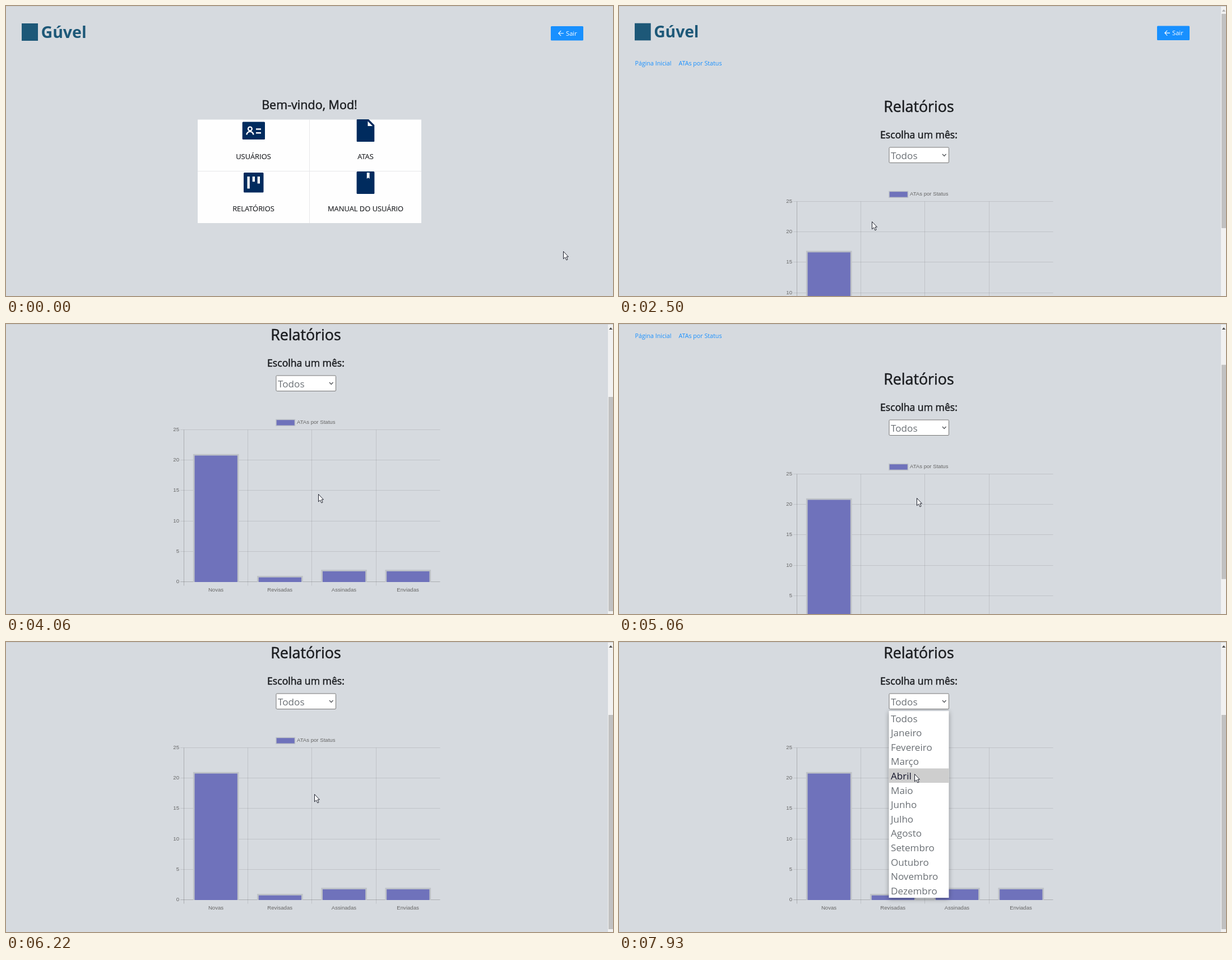
An HTML page for the animation above (8 s loop, 1083x517 px).

```html
<!DOCTYPE html>
<html lang="pt-BR">
<head>
<meta charset="utf-8">
<title>Relatórios</title>
<style>
@property --scroll { syntax: '<number>'; inherits: true; initial-value: 0; }
@property --row { syntax: '<integer>'; inherits: true; initial-value: 0; }

html, body { margin: 0; width: 100%; height: 100%; overflow: hidden; background: #d6dadf; }
svg {
  display: block; width: 1083px; height: 517px;
  font-family: 'Open Sans', 'Noto Sans', sans-serif;
  animation: scroll 8s infinite ease-out, row 8s infinite step-end;
}
text { white-space: pre; }
.mid { text-anchor: middle; }
.end { text-anchor: end; }
.head { fill: #1b1d20; stroke: #1b1d20; stroke-width: .5; }
.card { font-size: 12.9px; fill: #1b1d20; stroke: #1b1d20; stroke-width: .15; }
.link { font-size: 10.7px; fill: #1890ff; }
.opt { font-size: 17.1px; fill: #6b7075; }
.tick { font: 9.6px 'Liberation Sans', Arial, sans-serif; fill: #666; }
.logo { font-size: 28.5px; font-weight: 700; fill: #1d5878; }
.icon { fill: #002b5e; }
.hole { fill: #fff; }
.bar { fill: #6f72bb; stroke: #bec2c7; stroke-width: 5.4; paint-order: stroke; }
.grid { stroke: rgba(0, 0, 0, .1); }
.axis { stroke: rgba(0, 0, 0, .2); }

.home { animation: leave 8s infinite step-end; }
.report { visibility: hidden; animation: enter 8s infinite step-end; }
.page { transform: translateY(calc(var(--scroll) * -1px)); }
.thumb { transform: translateY(calc(var(--scroll) * .725px)); }
.up { opacity: calc(.4 + var(--scroll)); }
.chart { opacity: 0; animation: chart 8s infinite step-end; }
.grow { animation: grow 8s infinite linear; }
.lift {
  opacity: 0; fill: #fefefe;
  filter: drop-shadow(0 1px 1px rgba(0, 0, 0, .16)) drop-shadow(0 3px 4px rgba(0, 0, 0, .28));
  animation: lift 8s infinite linear;
}
.list { visibility: hidden; animation: open 8s infinite step-end; }
.sheet { filter: drop-shadow(0 2px 4px rgba(0, 0, 0, .35)); }
.chosen { opacity: calc(1 - max(var(--row) - var(--i), var(--i) - var(--row))); }
.chosen .opt { fill: #14152b; }
.cursor { animation: move 8s infinite linear; fill: #fff; stroke: #1c1f2b; stroke-width: 1; stroke-linejoin: round; }
.arrow { animation: arrow 8s infinite step-end; }
.hand { opacity: 0; animation: hand 8s infinite step-end; }

@keyframes leave { 24.5% { visibility: hidden; } }
@keyframes enter { 24.5% { visibility: visible; } }
@keyframes chart { 26.3% { opacity: 1; } }
@keyframes open { 88.4% { visibility: visible; } }
@keyframes arrow { 8.6%, 20% { opacity: 0; } 22.6% { opacity: 1; } }
@keyframes hand { 8.6%, 20% { opacity: 1; } 22.6% { opacity: 0; } }
@keyframes lift { 0%, 8.6% { opacity: 0; } 11.5%, 24.5% { opacity: 1; } 24.6%, 100% { opacity: 0; } }
@keyframes grow {
  0%, 27% { transform: translateY(var(--rise)); animation-timing-function: cubic-bezier(.165, .84, .44, 1); }
  39.5%, 100% { transform: none; }
}
@keyframes scroll {
  0%, 39.8% { --scroll: 0; }
  46.75%, 51.2% { --scroll: 160; }
  57%, 63.5% { --scroll: 81; }
  67.5%, 70.8% { --scroll: 0; }
  74.75%, 100% { --scroll: 160; }
}
@keyframes row {
  0% { --row: 0; }
  89.9% { --row: 1; }
  90.8% { --row: 2; }
  91.8% { --row: 3; }
  92.7% { --row: 4; }
  93.6% { --row: 5; }
  99.1%, 100% { --row: 4; }
}
@keyframes move {
  0%, .8% { transform: translate(994px, 437px); }
  3.5% { transform: translate(850px, 434px); }
  7% { transform: translate(590px, 404px); }
  10.5% { transform: translate(439px, 345px); }
  12.5%, 24.5% { transform: translate(447px, 343px); }
  27.4%, 31.3% { transform: translate(451px, 384px); }
  39% { transform: translate(535px, 282px); }
  46.75%, 50.8% { transform: translate(557px, 303px); }
  59%, 63.5% { transform: translate(531px, 310px); }
  72%, 77.8% { transform: translate(550px, 271px); }
  87%, 88.4% { transform: translate(545px, 107px); }
  95%, 98.2% { transform: translate(532px, 286px); }
  99.1%, 100% { transform: translate(527px, 235px); }
}
</style>
</head>
<body>
<svg viewBox="0 0 1083 517">
  <defs>
    <g id="brand">
      <rect x="28" y="31" width="29" height="31" fill="#1d5878"/>
      <text class="logo" x="62.5" y="57">Gúvel</text>
    </g>
    <g id="exit">
      <rect width="58" height="25.5" rx="1.5" fill="#1890ff"/>
      <path d="M23 12.7H14M18.2 8.2 13.8 12.7l4.4 4.5" fill="none" stroke="#fff" stroke-width="1.1"/>
      <text x="27" y="16.8" font-size="11.2" fill="#fff">Sair</text>
    </g>
    <clipPath id="plot"><rect x="310" y="340" width="470" height="279.6"/></clipPath>
  </defs>

  <g class="home">
    <use href="#brand"/>
    <use href="#exit" x="972" y="36"/>
    <text class="head mid" x="541.5" y="184" font-size="21.5">Bem-vindo, Mod!</text>
    <rect x="342" y="202.5" width="399" height="184.5" fill="#fefefe"/>
    <rect class="lift" x="342" y="295" width="199.5" height="92.3"/>
    <rect x="541.5" y="295" width="199.5" height="92" fill="#fefefe"/>
    <path d="M342 294.5H741M541.5 202.5V387" stroke="#e6e7e9"/>

    <rect class="icon" x="421.7" y="206.5" width="40.3" height="31.5" rx="1.5"/>
    <path d="M429.4 229.5a6 5.6 0 0 1 12 0M446 219.5h9M446 226.3h9" fill="none" stroke="#fff" stroke-width="2.4"/>
    <circle cx="435.4" cy="219" r="3.4" fill="none" stroke="#fff" stroke-width="2.3"/>

    <path class="icon" d="M627 202H647L657.3 212.3V241q0 1-1 1H626.7q-1 0-1-1V203q0-1 1.3-1z"/>
    <path class="hole" d="M645.5 205.5v8.5h8.500z"/>

    <rect class="icon" x="424" y="297" width="35.5" height="35.5" rx="1.5"/>
    <path class="hole" d="M430.5 304h4.3v21.500h-4.300zM439.700 304h4.300v9.300h-4.300zM448.700 304h4.300v12.500h-4.300z"/>

    <rect class="icon" x="625.6" y="295" width="31.8" height="40" rx="1.5"/>
    <path class="hole" d="M643.8 297h4.8v11l-2.4-2-2.4 2z"/>

    <g class="card mid">
      <text x="441.5" y="273">USUÁRIOS</text>
      <text x="641.5" y="273">ATAS</text>
      <text x="441.5" y="366">RELATÓRIOS</text>
      <text x="641.5" y="366">MANUAL DO USUÁRIO</text>
    </g>
  </g>

  <g class="report">
    <g class="page">
      <use href="#brand" transform="translate(.3 0) scale(.99)"/>
      <use href="#exit" x="960" y="35.4"/>
      <text class="link" x="28.5" y="106.3">Página Inicial</text>
      <text class="link" x="106.5" y="106.3">ATAs por Status</text>
      <text class="head mid" x="535" y="189.3" font-size="26.8">Relatórios</text>
      <text class="head mid" x="535" y="235.7" font-size="17.6">Escolha um mês:</text>
      <rect x="482" y="252" width="106.5" height="27.5" rx="1.5" fill="#fff" stroke="#767676"/>
      <text class="opt" x="485" y="273">Todos</text>
      <path d="M577 264l3.3 3.5 3.3-3.5" fill="none" stroke="#55585c" stroke-width="1.4"/>
      <g class="chart" id="chart"></g>
    </g>
    <rect x="1074" width="9" height="517" fill="#f1f1f1"/>
    <path class="up" d="M1075.8 10l3.2-4 3.2 4z" fill="#505050"/>
    <rect class="thumb" x="1075" y="14" width="8" height="382" fill="#c1c1c1"/>
  </g>

  <g class="list" id="list">
    <rect class="sheet" x="481.5" y="123" width="107" height="333" fill="#fff"/>
  </g>

  <rect width="1083" height="1" fill="#c9cdd2"/>

  <g class="cursor">
    <path class="arrow" d="M.5 .5V13.8l3.1-2.9 2.3 5 2.2-1-2.2-4.800H9.500z"/>
    <path class="hand" d="M-.5 12V2a1.500 1.500 0 0 1 3 0V7q3-.6 3 1q2.600-.3 2.600 1.200q1.400.2 .9 3.200q0 2.500-1.300 4.600V18.300H.8l-4.500-6.500q-1.300-2 .9-2.300z"/>
  </g>
</svg>

<script>
const BASE = 619.6, UNIT = 10.86, LEFT = 317.4, STEP = 114.2;
const bars = { Novas: 21, Revisadas: 1, Assinadas: 2, Enviadas: 2 };
const months = ['Todos', 'Janeiro', 'Fevereiro', 'Março', 'Abril', 'Maio', 'Junho', 'Julho',
  'Agosto', 'Setembro', 'Outubro', 'Novembro', 'Dezembro'];

const snap = v => Math.floor(v) + .5;
const line = (kind, x1, y1, x2, y2) =>
  `<line class="${kind}" x1="${x1}" y1="${y1}" x2="${x2}" y2="${y2}"/>`;
const tick = (align, x, y, label) => `<text class="tick ${align}" x="${x}" y="${y}">${label}</text>`;

let grid = '', columns = '', labels = '';
for (let value = 0; value <= 25; value += 5) {
  const y = snap(BASE - value * UNIT);
  grid += line(value ? 'grid' : 'axis', 311, y, 774.5, y);
  labels += tick('end', 309, y + 2.8, value);
}
Object.entries(bars).forEach(([name, value], i) => {
  const left = LEFT + i * STEP, x = snap(left), height = value * UNIT;
  grid += line(i ? 'grid' : 'axis', x, 348.5, x, 626.5);
  columns += `<rect class="bar grow" style="--rise:${height}px" x="${left + 19.2}" y="${BASE - height + 3}"
    width="76.2" height="${height + 10}"/>`;
  labels += tick('mid', left + STEP / 2, 637, name);
});
chart.innerHTML = `${grid}<g clip-path="url(#plot)">${columns}</g>${labels}
  <rect class="bar" style="stroke-width:3" x="482.7" y="331.2" width="32" height="9.4"/>
  ${tick('', 519, 338.2, 'ATAs por Status')}`;

list.innerHTML += months.map((month, i) => {
  const top = 123 + i * 25.6;
  const label = `<text class="opt" x="485" y="${top + 19.6}">${month}</text>`;
  return `${label}<g class="chosen" style="--i:${i}">
    <rect x="481.5" y="${top}" width="107" height="25.6" fill="#cecece"/>${label}</g>`;
}).join('');
</script>
</body>
</html>
```
